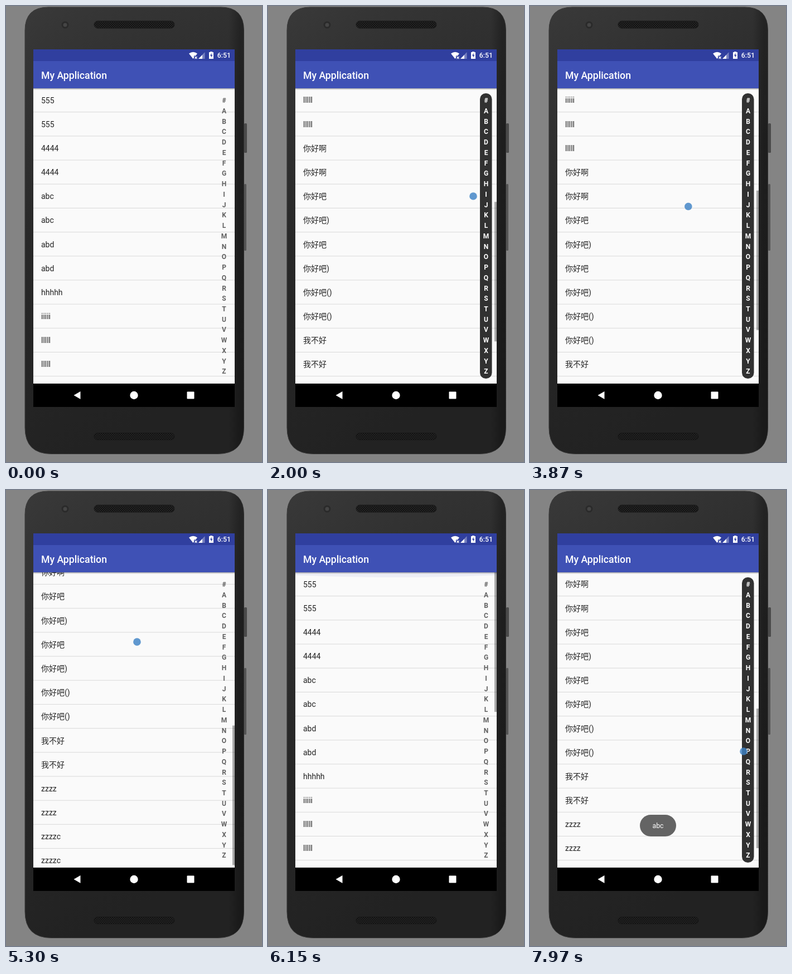
Recreate the animation shown at these times as an HTML page. Size 459x820 px, loop 8 s.

```html
<!DOCTYPE html>
<html lang="zh-CN">
<head>
<meta charset="utf-8">
<title>My Application</title>
<style>
html, body { margin: 0; height: 100%; overflow: hidden; background: #848484; }
svg { display: block; width: 100vw; height: 100vh; }
text { font-family: Roboto, "Noto Sans CJK SC", "Noto Sans CJK", sans-serif; }
#rows text { font-size: 14px; fill: #222; }
#index text { font-size: 12px; font-weight: 700; text-anchor: middle; }
</style>
</head>
<body>
<svg viewBox="0 0 459 820">
  <defs>
    <linearGradient id="shell" x2=".25" y2="1">
      <stop stop-color="#393939"/><stop offset=".1" stop-color="#353535"/>
      <stop offset=".5" stop-color="#282828"/><stop offset="1" stop-color="#222"/>
    </linearGradient>
    <linearGradient id="side">
      <stop offset=".93" stop-opacity="0"/><stop offset=".98" stop-opacity=".25"/>
    </linearGradient>
    <linearGradient id="shade" x2="0" y2="1">
      <stop stop-opacity=".35"/><stop offset="1" stop-opacity="0"/>
    </linearGradient>
    <pattern id="mesh" width="4" height="4" patternUnits="userSpaceOnUse">
      <rect width="4" height="4" fill="#111"/><path d="M0 0h2v2H0zM2 2h2v2H2z" fill="#252525"/>
    </pattern>
    <path id="body" d="M76 2H385Q426.500 2 426.500 44V758Q426.500 805.500 379 805.500H82Q34 805.500 34 758V44Q34 2 76 2Z"/>
    <clipPath id="list"><rect x="49" y="148" width="361" height="531"/></clipPath>
    <clipPath id="row"><rect x="49" y="321" width="361" height="43"/></clipPath>
  </defs>

  <rect width="459" height="820" fill="#848484"/>
  <rect x="427" y="211" width="5" height="53" rx="1.5" fill="#4a4a4a"/>
  <rect x="427" y="320" width="4" height="120" rx="1.5" fill="#555"/>
  <use href="#body" fill="url(#shell)" stroke="#3c3c3c"/>
  <use href="#body" fill="url(#side)"/>
  <rect x="158" y="27" width="144" height="13" rx="6.5" fill="url(#mesh)" stroke="#1b1b1b"/>
  <rect x="158" y="768" width="144" height="12" rx="6" fill="url(#mesh)" stroke="#151515"/>
  <circle cx="106" cy="34" r="6.5" fill="#2a2a2a"/>
  <circle cx="106" cy="34" r="3.5" fill="#454545"/>

  <rect x="49" y="78" width="361" height="643" fill="#fafafa"/>
  <g clip-path="url(#list)">
    <g id="rows"></g>
    <g clip-path="url(#row)"><circle id="ripple" cx="188" cy="343"/></g>
    <rect id="thumb" x="406" width="4" height="251" fill-opacity=".33"/>
    <g id="index"><rect id="pill" x="380" y="157" width="21.5" height="513" rx="10.5" fill="#313131"/></g>
    <ellipse id="glow" cx="229.5" rx="541" fill="#3f51b5"/>
    <rect x="49" y="148" width="361" height="3" fill="url(#shade)"/>
  </g>

  <rect x="49" y="78" width="361" height="21" fill="#303f9f"/>
  <rect x="49" y="99" width="361" height="49" fill="#3f51b5"/>
  <text x="63" y="130.7" font-size="17.7" font-weight="500" fill="#fff">My Application</text>
  <text x="403" y="93.4" font-size="12.3" font-weight="500" fill="#fff" text-anchor="end">6:51</text>
  <g fill="#fff">
    <path d="M328 85.5Q335.5 80 343 85.5L340 89.5H337V93L335.5 95Z"/>
    <path d="M338.5 91l4 4m0-4l-4 4" stroke="#fff" stroke-width="1.2"/>
    <path d="M356.5 83v12H345z" opacity=".35"/>
    <path d="M352 88v7h-7z"/>
    <path d="M366 83v-1h4v1h2v12h-8V83z"/>
    <path d="M368.5 84.5l-2.500 5h1.800v3.500l2.500-5h-1.800z" fill="#303f9f"/>
  </g>
  <rect x="49" y="679" width="361" height="42"/>
  <g fill="#fff">
    <path d="M121.5 700l12-7v14z"/>
    <circle cx="229.5" cy="700" r="7.2"/>
    <rect x="324.5" y="693.5" width="13" height="13" rx="1"/>
  </g>
  <g id="toast">
    <rect x="197" y="584" width="65" height="39" rx="19.5" fill="#646464"/>
    <text x="229.5" y="608" font-size="12.3" fill="#fff" text-anchor="middle">abc</text>
  </g>
  <circle id="dot" r="6.8" fill="#3e82c6" fill-opacity=".82"/>
</svg>
<script>
const LOOP = 8000, ROW = 43.18, TOP = 148, VIEW = 531;
const LETTERS = '#ABCDEFGHIJKLMNOPQRSTUVWXYZ', STEP = 18.74, INDEX_TOP = 160.6, LAG = 45;
const pairs = '555 4444 abc abd hhhhh'.split(' ').flatMap(s => [s, s]);
const items = [...pairs, 'iiiii', 'lllll', 'lllll', '你好啊', '你好啊',
  '你好吧', '你好吧)', '你好吧', '你好吧)', '你好吧()', '你好吧()', '我不好', '我不好',
  'zzzz', 'zzzz', 'zzzzc', 'zzzzc'];
// The second "hhhhh" is not in the list.
items.splice(9, 1);
const CONTENT = items.length * ROW, MAX = CONTENT - VIEW;

// First row of each letter; Chinese rows sort by their pinyin initial.
const initial = s => ({ 你: 'N', 我: 'W' })[s[0]] || (/\d/.test(s) ? '#' : s[0].toUpperCase());
const sections = [...LETTERS].map(c => items.findIndex(s => initial(s) === c));

const $ = id => document.getElementById(id);
function set(el, attrs) {
  for (const k in attrs) el.setAttribute(k, attrs[k]);
}
function add(parent, name, attrs, text = '') {
  const el = document.createElementNS('http://www.w3.org/2000/svg', name);
  set(el, attrs);
  el.textContent = text;
  return parent.appendChild(el);
}
const show = (el, on) => set(el, { visibility: on ? 'visible' : 'hidden' });
const ramp = (t, a, b) => Math.min(1, Math.max(0, (t - a) / (b - a)));

items.forEach((s, i) => {
  const y = TOP + i * ROW;
  add($('rows'), 'text', { x: 63, y: y + 26.5 }, s);
  add($('rows'), 'rect', { x: 49, y: y + ROW - 1, width: 361, height: 1, fill: '#d9d9d9' });
});
const letters = add($('index'), 'g', {});
[...LETTERS].forEach((c, i) => add(letters, 'text', { x: 391, y: 174.2 + i * STEP }, c));

// A gesture starts at a point and makes timed moves; between moves the finger rests.
const scrub = { from: 370, to: 4600, x: 391, y: 192, moves: [
  [370, 1170, 388, 470], [1210, 2000, 368, 342], [2050, 2550, 350, 250],
  [2870, 3250, 330, 146], [3510, 4370, 220, 657]] };
const pull = { from: 4830, to: 5480, x: 240, y: 255, moves: [[4830, 5300, 235, 272], [5300, 5480, 225, 480]] };
const tap = { from: 6330, to: 6430, x: 188, y: 343, moves: [] };
const rescrub = { from: 7520, to: LOOP, x: 391, y: 192, moves: [[7520, 7970, 383, 470]] };

const gestureAt = t => [scrub, pull, tap, rescrub].find(g => t >= g.from && t < g.to);
function finger(g, t) {
  let { x, y } = g;
  for (const [a, b, toX, toY] of g.moves) {
    const k = ramp(t, a, b);
    x += (toX - x) * k;
    y += (toY - y) * k;
  }
  return { x, y };
}

// Letters without rows keep the section touched before them.
function indexScroll(g, t) {
  for (let s = t - LAG; s >= g.from; s -= 5) {
    const row = sections[Math.max(0, Math.floor((finger(g, s).y - INDEX_TOP) / STEP))];
    if (row >= 0) return Math.min(MAX, row * ROW);
  }
  return 0;
}
function scrollAt(t) {
  if (t < pull.from) return indexScroll(scrub, t);
  if (t >= rescrub.from) return indexScroll(rescrub, t);
  const dragged = MAX - Math.max(0, finger(pull, t).y - 264);
  return dragged * (1 - ramp(t, pull.to, 5670));
}

function draw(t) {
  const scroll = scrollAt(t), g = gestureAt(t);
  set($('rows'), { transform: `translate(0 ${-scroll})` });
  set($('thumb'), { y: TOP + scroll / CONTENT * VIEW });
  show($('thumb'), t >= scrub.from + LAG);

  const held = g === scrub || g === rescrub;
  show($('pill'), held);
  set(letters, { fill: held ? '#fff' : '#606060' });

  const fade = 1 - ramp(t, 5730, 6400);
  const size = .9 * ramp(t, 5655, 5700) * fade * fade;
  set($('glow'), { cy: TOP - 468.5 * size, ry: 541 * size, opacity: Math.min(.5, size * .55) });
  show($('glow'), size > 0);

  set($('ripple'), { r: 20 + 240 * ramp(t, 6330, 6600), opacity: .1 * ramp(t, 6330, 6400) * (1 - ramp(t, 6450, 6900)) });
  set($('toast'), { opacity: ramp(t, 6420, 6900) });

  show($('dot'), g);
  if (g) {
    const { x, y } = finger(g, t);
    set($('dot'), { cx: x, cy: y });
  }
}

const start = performance.now();
function tick() {
  draw((performance.now() - start) % LOOP);
  requestAnimationFrame(tick);
}
tick();
</script>
</body>
</html>
```
